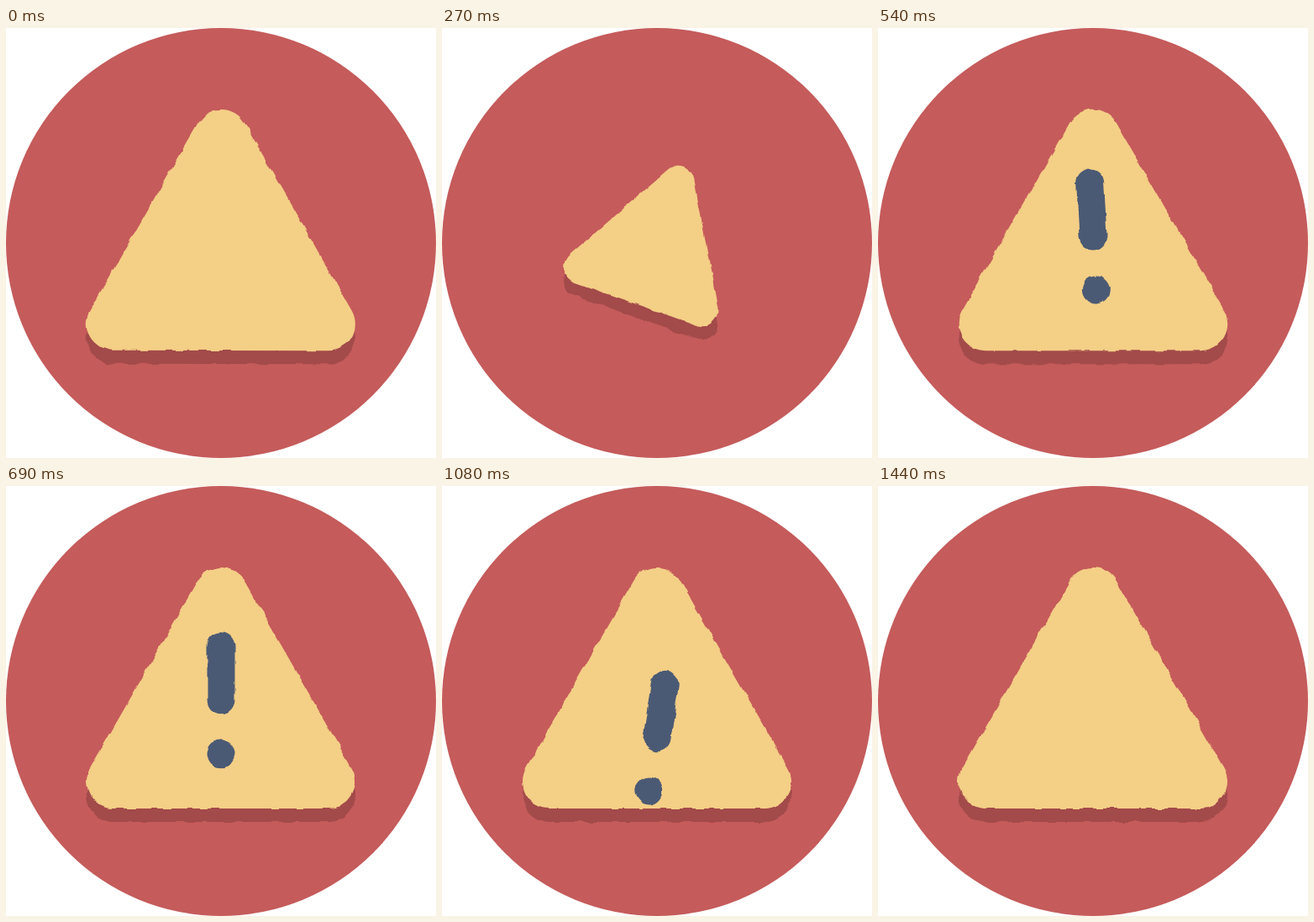
Write an HTML page without scripts that moves like this. It is 512x512 px and loops after 1470 ms.

```html
<!DOCTYPE html>
<html lang="en">
<head>
<meta charset="utf-8">
<title>Warning sign</title>
<style>
  html, body { margin: 0; width: 100%; height: 100%; overflow: hidden; background: #fff; }
  svg { display: block; width: 100vw; height: 100vh; }

  .sign, .mark {
    transform-origin: 256px 256px;
    animation: 1470ms linear infinite;
  }
  .sign { animation-name: squash, tilt; }
  .mark {
    animation-name: slide, lean;
    fill: none; stroke: #4b5a74; stroke-width: 33; stroke-linecap: round;
  }

  @keyframes squash {
    0% { scale: 1; animation-timing-function: ease-out; }
    6.12% { scale: 1.01; animation-timing-function: ease-in-out; }
    18.37% { scale: .6; animation-timing-function: cubic-bezier(.3, 0, .4, 1); }
    28.57% { scale: 1.047; animation-timing-function: ease-in-out; }
    38%, 100% { scale: 1; }
  }
  @keyframes tilt {
    0% { rotate: 0deg; animation-timing-function: ease-out; }
    18.37% { rotate: 19.5deg; animation-timing-function: ease-in-out; }
    28.57%, 100% { rotate: 0deg; }
  }
  @keyframes slide {
    0%, 18.37% { translate: 0 220px; }
    28.57% { translate: 0 49px; animation-timing-function: ease-out; }
    36.7% { translate: 0 -8px; animation-timing-function: ease-in-out; }
    46.94% { translate: 0 -1.3px; }
    52%, 64% { translate: 0 0; animation-timing-function: ease-in-out; }
    69% { translate: 0 -8px; animation-timing-function: ease-in; }
    80%, 100% { translate: 0 220px; }
  }
  @keyframes lean {
    0%, 18.37% { rotate: 26deg; }
    28.57% { rotate: 21.6deg; animation-timing-function: ease-out; }
    36.7% { rotate: -3deg; animation-timing-function: ease-in-out; }
    45%, 67% { rotate: 0deg; animation-timing-function: ease-in; }
    80%, 100% { rotate: 26deg; }
  }
</style>
</head>
<body>
<svg viewBox="0 0 512 512">
  <defs>
    <path id="triangle" d="M100.2 336.1 L228.2 113.1 A32 32 0 0 1 283.8 113.1 L411.8 336.1 A32 32 0 0 1 384 384 H128 A32 32 0 0 1 100.2 336.1Z"/>
    <clipPath id="inside"><use href="#triangle" class="sign"/></clipPath>
    <!-- Hand-cut edges that shift on every frame -->
    <filter id="rough" filterUnits="userSpaceOnUse" x="0" y="0" width="512" height="512" color-interpolation-filters="sRGB">
      <feTurbulence type="fractalNoise" baseFrequency=".07" numOctaves="1" seed="1">
        <animate attributeName="seed" values="1;2;3;4;5;6;7" calcMode="discrete" dur="210ms" repeatCount="indefinite"/>
      </feTurbulence>
      <feDisplacementMap in="SourceGraphic" scale="7" xChannelSelector="R" yChannelSelector="G"/>
    </filter>
  </defs>

  <circle cx="256" cy="256" r="256" fill="#c55b5b"/>
  <g filter="url(#rough)">
    <g transform="translate(0 16)" fill="#a34a4a"><use href="#triangle" class="sign"/></g>
    <use href="#triangle" class="sign" fill="#f4cf86"/>
    <g clip-path="url(#inside)">
      <path class="mark" d="M256 192V256M256 320h.01"/>
    </g>
  </g>
</svg>
</body>
</html>
```
